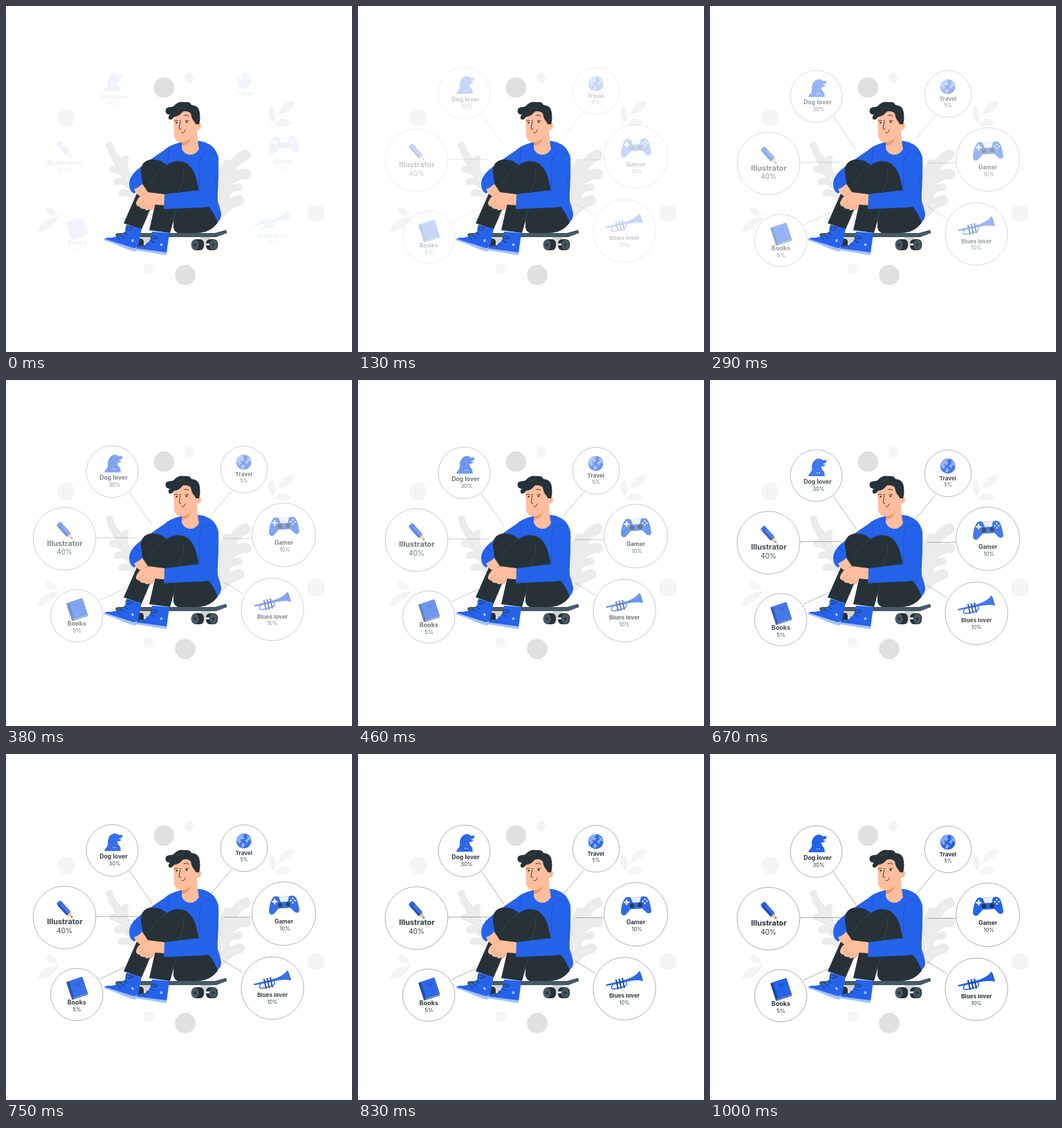
Animation of 500x500 px, one loop 1.04 s. Source, as an HTML page:

```html
<!DOCTYPE html>
<html lang="en">
<head>
<meta charset="utf-8">
<title>Interests</title>
<style>
  html, body { margin: 0; width: 100%; height: 100%; overflow: hidden; background: #fff; }
  svg { display: block; width: 100vw; height: 100vh; }
  text { font-family: Inter, Lato, sans-serif; text-anchor: middle; fill: #263238; }
  .name { font-weight: 700; }
  .blue { fill: #2563eb; }
  .navy { fill: #1a469f; }
  .dark { fill: #263238; }
  .skin { fill: #ffbe9d; }
  .pale { fill: #a5c0fb; }
  .line { fill: none; stroke: #263238; stroke-width: .9; stroke-linecap: round; stroke-linejoin: round; }
  .seam { fill: none; stroke: #1b4bb8; stroke-width: .6; }
  .fold { fill: none; stroke: #52616a; stroke-width: .4; }
  .plant { fill: none; stroke: #ebebeb; stroke-linecap: round; }
  .vein { fill: none; stroke: #f7f7f7; stroke-width: .5; }
  .ring { fill: #fff; stroke: #263238; stroke-width: .4; }
  .link { stroke: #263238; stroke-width: .4; }
</style>
</head>
<body>
<svg viewBox="0 0 500 500">
  <g fill="#e0e0e0"><circle cx="228.3" cy="118" r="14.8"/><circle cx="259" cy="388.7" r="14.8"/></g>
  <g fill="#f5f5f5">
    <circle cx="87" cy="161.3" r="12.7"/><circle cx="448" cy="299.7" r="12.7"/>
    <circle cx="264.8" cy="104" r="7.7"/><circle cx="206.3" cy="379.7" r="7.7"/>
  </g>

  <!-- lobed plants behind the sitter -->
  <g class="plant">
    <path stroke-width="10" d="M149.5 201Q153 216 170 234M172.5 221Q169 230 174 246M154 236Q164 235 178 252M161 254Q170 250 184 264M167 271Q176 268 190 276"/>
    <path stroke-width="13" d="M160 222Q172 240 190 276"/>
    <path stroke-width="15" d="M346 215Q329 222 318 250M347 243Q331 240 312 264M337 281Q322 284 312 297"/>
    <path stroke-width="11" d="M320 227Q312 238 312 262M336 262Q325 262 308 275"/>
    <path stroke-width="18" d="M322 240L310 294"/>
  </g>
  <path class="vein" d="M149 201Q166 232 190 278M174 222L174 243M155 236L174 244M162 254L182 262M347 213Q320 240 309 298M348 243L316 258M342 279L310 294"/>

  <!-- loose sprigs -->
  <g fill="#f5f5f5" stroke="#ebebeb" stroke-width=".5">
    <path d="M395 156Q395 140 416 137Q415 153 395 156ZM385 168Q375 154 383 145Q394 153 385 168ZM388 171Q402 157 411 169Q402 178 388 171Z"/>
    <path d="M45 326Q51 307 76 306Q65 325 45 326ZM74 301Q59 306 58 292Q68 289 74 301Z"/>
    <path fill="none" d="M382 172Q389 160 411 141M384 149L386 167M46 325Q61 312 87 298M61 295L74 301"/>
  </g>

  <g id="bubbles">
    <g id="rings"></g>

    <g id="dog">
      <path class="blue" d="M142 142Q143 138 146 136Q148 132 147 127Q149 118 156 116.500Q161 116 163 119L168 118.500Q169 121 167 123L163 124L167 126Q165 128 161 128Q161 132 165 136L166 142Z"/>
      <path class="seam" d="M154 120Q151 123 150 129Q153 132 156 125M152 135Q158 138 164 134"/>
      <g fill="#fff"><circle cx="155" cy="137" r=".8"/><circle cx="158" cy="137" r=".8"/></g>
    </g>

    <g id="globe">
      <circle class="blue" cx="343.7" cy="127.3" r="10.8"/>
      <path fill="#87a9f5" d="M335 121Q340 116 345 117L342 121L345 123L341 126L338 124L340 129L337 132L333 126ZM348 119Q354 122 354 127L350 126L349 131L345 127L349 124ZM341 130L346 132L343 137L340 136Z"/>
    </g>

    <g id="pencil" transform="translate(75.5 215.5) rotate(48)">
      <rect class="blue" x="0" y="-4" width="23" height="8" rx="2"/>
      <path class="navy" d="M4 -4h1v8h-1zM5 1.500h18v2.500h-18z"/>
      <path class="skin" d="M23 -4L31 0L23 4Z"/>
      <path class="dark" d="M28.500 -1.300L31 0L28.500 1.300Z"/>
      <path d="M6 -1.500H23" stroke="#7ea1f4" stroke-width=".6"/>
    </g>

    <g id="gamepad">
      <path class="blue" d="M386 209Q388 206 393 208L410 207Q414 205 418 208Q422 213 424 228Q422 233 417 230L411 224L394 225L387 233Q382 236 380 230Q380 217 386 209Z"/>
      <path fill="#e9effd" d="M394 208L409 207L407 215L397 215.500ZM387 211h2.400v2.800h2.800v2.400h-2.800v2.800h-2.400v-2.800h-2.800v-2.400h2.800z"/>
      <g class="dark"><circle cx="396" cy="220" r="3.3"/><circle cx="407.500" cy="219" r="3.3"/></g>
      <g fill="#e9effd"><circle cx="414.5" cy="210.500" r="1.2"/><circle cx="414.5" cy="216.500" r="1.2"/><circle cx="411.500" cy="213.500" r="1.2"/><circle cx="417.500" cy="213.500" r="1.2"/></g>
    </g>

    <g id="book" transform="translate(102.5 340) rotate(-18)">
      <rect class="navy" x="-12" y="-13" width="24.5" height="27" rx="1"/>
      <path d="M-10 12.500H12" stroke="#fff" stroke-width=".6"/>
      <rect class="blue" x="-8" y="-13" width="20.5" height="24.5"/>
      <path d="M-2 -7H8M0 -4H6M-11 -9h3M-11 -4h3M-11 1h3M-11 6h3" stroke="#1a469f" stroke-width=".8"/>
    </g>

    <g id="trumpet">
      <path class="blue" d="M358 334L382 328Q400 324 407 314L412 329Q402 326 384 331L359 336Z"/>
      <path d="M369 333Q363 340 370 340.500L384 337Q391 334 387 330" fill="none" stroke="#2563eb" stroke-width="1.5"/>
      <path d="M373 327L376 341M377.500 326L380.500 340M382 325L385 339" stroke="#1a469f" stroke-width="2"/>
      <path d="M371.500 327.500L374 327M376 326.500L379 326M380.500 325.500L383.500 325M408 317L411 328" stroke="#1a469f"/>
    </g>
  </g>

  <!-- skateboard -->
  <g id="board">
    <path fill="#d5d5d5" d="M281 334H297L291 340L295 347H281ZM195 334H213V346H195Z"/>
    <g class="dark">
      <rect x="269" y="337" width="17" height="16" rx="6"/><rect x="289" y="337" width="17" height="16" rx="6"/>
      <rect x="188" y="336" width="11" height="15" rx="5"/>
    </g>
    <g fill="#455a64"><ellipse cx="273" cy="345" rx="5.5" ry="7.5"/><ellipse cx="299.5" cy="345" rx="5.5" ry="7.5"/></g>
    <g class="dark"><circle cx="273" cy="345" r="2"/><circle cx="299.5" cy="345" r="2"/></g>
    <path d="M287 344.500H294" stroke="#e0e0e0" stroke-width="3"/>
    <path fill="#455a64" d="M159 329Q161 327.500 166 328H302L318 323.500L319.500 328L304 334H165Q158 334 158 331Z"/>
  </g>

  <!-- sitter -->
  <g id="sitter">
    <path class="blue" d="M252 197Q236 201 229 208Q205 224 189 237Q178 247 178 257Q178 267 185 271L198 262L215 260L250 300L304 314Q313 307 310.500 298L305 281Q308 245 307 219Q302 198 279 195Z"/>
    <path class="seam" d="M236 205L234 224M185 240Q190 248 195 248"/>
    <path class="dark" d="M196 247Q191 226 208 222Q224 220 234 232L240 270L210 290L196 323L170 314L189 271L198 262Z"/>
    <path class="dark" d="M243 290L291 288Q301 298 306 313Q295 328 276 328H248Q241 325 242 316Z"/>
    <path class="dark" d="M232 230Q243 222 256 225Q268 229 274 246L279 267L248 290L237 328L207 324L216 284L206 258Z"/>
    <path class="fold" d="M232 230Q216 240 208 258M256 236Q258 250 250 268M208 291L202 310M246 292L239 320"/>

    <path class="blue" d="M279 266L285 264L303 242L306 282Q301 290 286 291L228 293.500L229 272Z"/>
    <path class="seam" d="M303 213Q289 205 283 216Q277 231 280 247L279 266M303 244Q305 265 303 280M285 266L272 268M305 281Q311 292 309 305"/>

    <g id="hands">
      <path class="skin" d="M185 265Q192 262 197 257L205 269L229 272L228.500 288L215 287L213 293Q211 297 207 294Q203 297 200 293Q195 294 193 290Q187 289 188 284Q190 278 194 275Q188 272 185 265Z"/>
      <path d="M195 275Q200 270 206 270M192 287L199 282M195 291L203 286M201 294L208 289M208 295L213 289" fill="none" stroke="#e58a65" stroke-width=".6"/>
    </g>

    <g id="head">
      <path class="skin" d="M242 160L251 150H267L275 169Q282 166 282 173Q281 180 276 179L277 196L279 207Q273 216 265 215Q256 213 254 206V197Q244 197 243 187Z"/>
      <path fill="#eb996e" d="M254 197Q264 196 268 190Q265 200 254 202Z"/>
      <path class="dark" d="M230.500 152Q230 146 238 146Q242 146 245 142Q251 137 258 139Q266 138 268 143Q277 144 279 150Q282 161 279 171H274.500L272 167Q268 163 267 155Q261 150 255 153Q250 160 243 160Q240 165 236 164Q233 161 237 157Q231 157 230.500 152Z"/>
      <path d="M246 147Q253 146 257 143M267 147Q274 149 276 156" fill="none" stroke="#455a64" stroke-width=".5"/>
      <path class="line" d="M252 165Q251 173 250 177Q251 179 253 178M254 183Q258 184 259 179"/>
      <path class="line" d="M243.500 166Q246 164 248 165.500M257 158.500Q261 156 264 159M259 166Q261 164 264 166"/>
      <g class="dark"><circle cx="246.5" cy="168.5" r="1.2"/><circle cx="261" cy="167.7" r="1.2"/></g>
      <path d="M278 171Q280 171 279 175" fill="none" stroke="#eb996e" stroke-width=".7"/>
    </g>

    <g id="shoes">
      <path class="blue" d="M174 316L196 322L191 347L186 354L142 338Q144 334 151 335Q167 333 172 326Z"/>
      <path class="pale" d="M141 336L185 350L190 348L187 355Q179 354 141 337Z"/>
      <path class="blue" d="M211 326L236 328L232 358L188 351Q190 346 200 346Q208 341 210 333Z"/>
      <path class="pale" d="M186 350L232 356L231.500 360L188 353Z"/>
      <path class="line" d="M173 320Q178 317 183 322Q178 326 173 322M170 327L176 331M165 331L171 335M160 333L165 338M210 333Q215 331 219 335Q214 338 209 335M208 338L214 342M203 342L208 347M197 345L201 350"/>
      <g class="pale"><circle cx="183" cy="339" r="1.9"/><circle cx="224.5" cy="345" r="1.9"/></g>
    </g>
  </g>
</svg>
<script>
const PERIOD = 1040, STEPS = 25, DROP = 20;
const bubbles = document.getElementById('bubbles');

// circle x, y, r | name, x, y, size | share, x, y, size | connector x1, y1, x2, y2
const items = [
  [153.5, 141, 37.4, 'Dog lover', 155.5, 152.8, 8.7, '30%', 157, 163, 7.6, 178, 170, 211, 218],
  [344, 137.8, 33.8, 'Travel', 343.8, 147.6, 8.1, '5%', 344, 156.5, 6.9, 326, 169, 297, 203],
  [84.5, 238, 45.4, 'Illustrator', 85, 248.2, 10.9, '40%', 84.5, 261, 10, 130, 236.5, 189, 236.5],
  [401.5, 232.4, 46, 'Gamer', 401.5, 246.8, 8.4, '10%', 403, 256.6, 7.4, 314, 237.5, 355.5, 237.5],
  [102.3, 349.3, 37.8, 'Books', 102.5, 363.6, 9, '5%', 102.5, 374, 8, 135, 327, 174, 309],
  [385, 340, 45.3, 'Blues lover', 385, 353.2, 8.2, '10%', 385, 363, 7.4, 314, 300, 343, 318],
];

const label = (kind, text, x, y, size) =>
  `<text class="${kind}" x="${x}" y="${y}" font-size="${size}">${text}</text>`;

document.getElementById('rings').innerHTML = items.map(
  ([cx, cy, r, name, nx, ny, ns, share, sx, sy, ss, x1, y1, x2, y2]) =>
    `<line class="link" x1="${x1}" y1="${y1}" x2="${x2}" y2="${y2}"/>` +
    `<circle class="ring" cx="${cx}" cy="${cy}" r="${r}"/>` +
    label('name', name, nx, ny, ns) + label('share', share, sx, sy, ss)
).join('');

// cubic-bezier(0, 0, .58, 1), solved by bisection
function easeOut(x) {
  let lo = 0, hi = 1;
  for (let i = 0; i < 24; i++) {
    const s = (lo + hi) / 2;
    if (1.74 * s * s * (1 - s) + s ** 3 < x) lo = s; else hi = s;
  }
  return lo * lo * (3 - 2 * lo);
}

function draw() {
  const t = performance.now() % PERIOD;
  const step = Math.min(STEPS, Math.floor(t / PERIOD * STEPS + 0.1) + 1);
  const p = easeOut(step / STEPS);
  bubbles.setAttribute('transform', `translate(0 ${DROP * (p - 1)})`);
  bubbles.setAttribute('opacity', p);
  requestAnimationFrame(draw);
}
draw();
</script>
</body>
</html>
```
